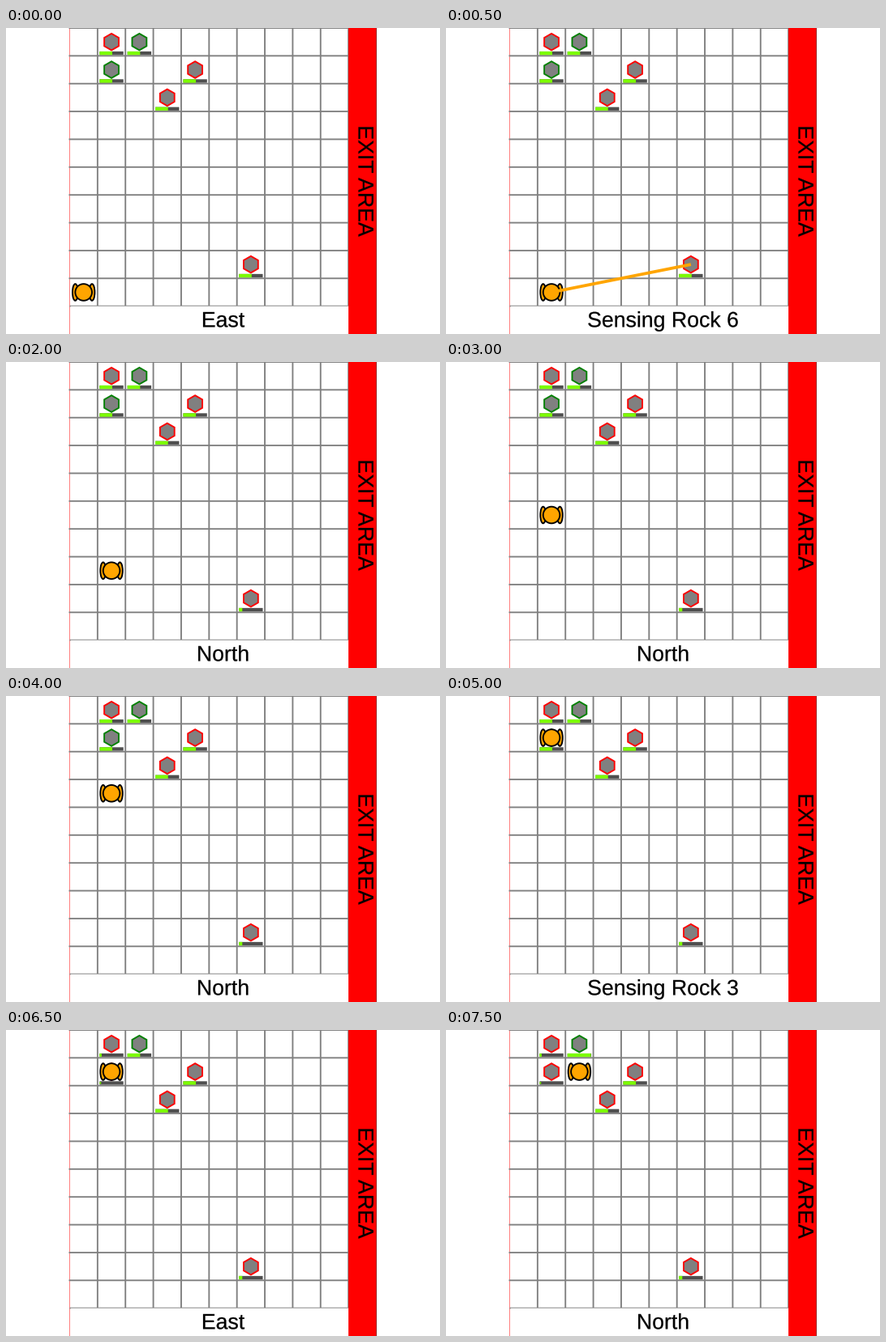
Write a matplotlib script that moves like this. It is 535 by 378 pixels and loops after 8 s.

```python
import math

import matplotlib.pyplot as plt
from matplotlib.animation import FuncAnimation
from matplotlib.patches import Circle, Ellipse, PathPatch, Rectangle, RegularPolygon
from matplotlib.textpath import TextPath
from matplotlib.transforms import Affine2D

W, H, DPI = 535, 378, 100
PX = 72 / DPI            # one pixel in points
LEFT = (W - H) / 2
CELL = H / 11
RIGHT, FLOOR = LEFT + 10 * CELL, 10 * CELL
STROKE = 0.5 / 25.4 * 96
FONT_SIZE = 20 * 96 / 72

# column, row, good
ROCKS = {1: (1, 0, False), 2: (2, 0, True), 3: (1, 1, True),
         4: (4, 1, False), 5: (3, 2, False), 6: (6, 8, False)}
MOVES = {"East": (1, 0), "North": (0, -1)}
# a number means sensing that rock
ACTIONS = ["East", 6] + ["North"] * 8 + [3, "Sample", 1, "East", 2, "North"]

fig = plt.figure(figsize=(W / DPI, H / DPI), dpi=DPI, facecolor="white")
ax = fig.add_axes([0, 0, 1, 1])
ax.set_xlim(0, W)
ax.set_ylim(H, 0)
ax.axis("off")


def point(col, row, dx=0.5, dy=0.5):
    return LEFT + (col + dx) * CELL, (row + dy) * CELL


def add(patch, z):
    patch.set_zorder(z)
    patch.set_snap(False)
    return ax.add_patch(patch)


def line(x0, y0, x1, y1, color, width, z):
    return ax.plot([x0, x1], [y0, y1], color=color, lw=width * PX, zorder=z,
                   solid_capstyle="butt", snap=False)[0]


def text_path(s):
    return TextPath((0, 0), s, size=FONT_SIZE, prop={"family": "Liberation Sans"})


def label(s, x, y, angle=0):
    """Text centred on its advance width, with its baseline through (x, y)."""
    advance = text_path(s + "l").get_extents().x1 - text_path("l").get_extents().x1
    place = Affine2D().translate(-advance / 2, 0).scale(1, -1).rotate_deg(angle).translate(x, y)
    return add(PathPatch(place.transform_path(text_path(s)), fc="black", ec="black",
                         lw=0.25 * PX), 9)


def box(x, y, w, h, color, z, stroke=0):
    return add(Rectangle((x, y), w, h, fc=color, ec=color if stroke else "none",
                         lw=stroke * PX, joinstyle="miter"), z)


def hexagon(col, row, radius, fill, edge, z):
    return add(RegularPolygon(point(col, row), 6, radius=radius * CELL, fc=fill,
                              ec=edge, lw=STROKE * PX, joinstyle="miter"), z)


def draw_rock(col, row, good, belief):
    x, y = point(col, row, 0.1, 0.87)
    return [
        hexagon(col, row, 0.3, "gray", "green" if good else "red", 3),
        box(x, y, 0.8 * CELL, 0.07 * CELL, "#4f4f4f", 4, STROKE),
        box(x, y, 0.8 * CELL * belief, 0.07 * CELL, "lawngreen", 5, STROKE),
    ]


def draw_robot(col, row):
    style = dict(fc="orange", ec="black", lw=STROKE * PX)
    parts = [add(Ellipse(point(col, row, dx), 0.2 * CELL, 0.6 * CELL, **style), 6)
             for dx in (0.2, 0.8)]
    return parts + [add(Circle(point(col, row), 0.3 * CELL, **style), 7)]


def draw_stage():
    line(LEFT, 0, LEFT, H, "#ff8080", 1, 0.5)
    for k in range(10):
        line(LEFT - 1, k * CELL, RIGHT, k * CELL, "gray", STROKE, 1)
        x = LEFT + (k + 1) * CELL
        line(x, 0, x, FLOOR, "gray", STROKE, 1)
    line(LEFT, FLOOR, RIGHT, FLOOR, "gray", STROKE, 1)
    box(LEFT + 1, FLOOR, 10 * CELL, CELL, "white", 2)
    box(RIGHT, 0, CELL, H, "red", 2)
    line(LEFT + H, 0, LEFT + H, H, "#800000", 0.8, 2.5)
    label("EXIT AREA", RIGHT + 12.4, H / 2, 90)


def state_at(step):
    """Replay the actions taken before this step."""
    col, row = 0, 9
    good = {i: rock[2] for i, rock in ROCKS.items()}
    belief = dict.fromkeys(ROCKS, 0.5)
    for action in ACTIONS[:step]:
        if action in MOVES:
            dx, dy = MOVES[action]
            col, row = col + dx, row + dy
        elif action == "Sample":
            for i, rock in ROCKS.items():
                if rock[:2] == (col, row):
                    good[i], belief[i] = False, 0
        else:
            rx, ry, _ = ROCKS[action]
            accuracy = 0.5 * (1 + 2 ** (-math.hypot(rx - col, ry - row) / 20))
            belief[action] = accuracy if good[action] else 1 - accuracy
    return col, row, good, belief


shown = []


def draw(step):
    while shown:
        shown.pop().remove()
    col, row, good, belief = state_at(step)
    action = ACTIONS[step]
    for i, (rx, ry, _) in ROCKS.items():
        shown.extend(draw_rock(rx, ry, good[i], belief[i]))
    shown.extend(draw_robot(col, row))
    caption = action
    if action == "Sample":
        shown.append(hexagon(col, row, 0.1, "green", "gray", 8))
    elif action in ROCKS:
        caption = f"Sensing Rock {action}"
        target = ROCKS[action][:2]
        if target != (col, row):
            shown.append(line(*point(col, row), *point(*target), "orange", 0.01 * H, 8))
    shown.append(label(caption, W / 2, 369.3))
    return shown


draw_stage()
anim = FuncAnimation(fig, draw, frames=len(ACTIONS), init_func=lambda: [],
                     interval=500, repeat=True, repeat_delay=0, blit=False)
plt.show()
```
